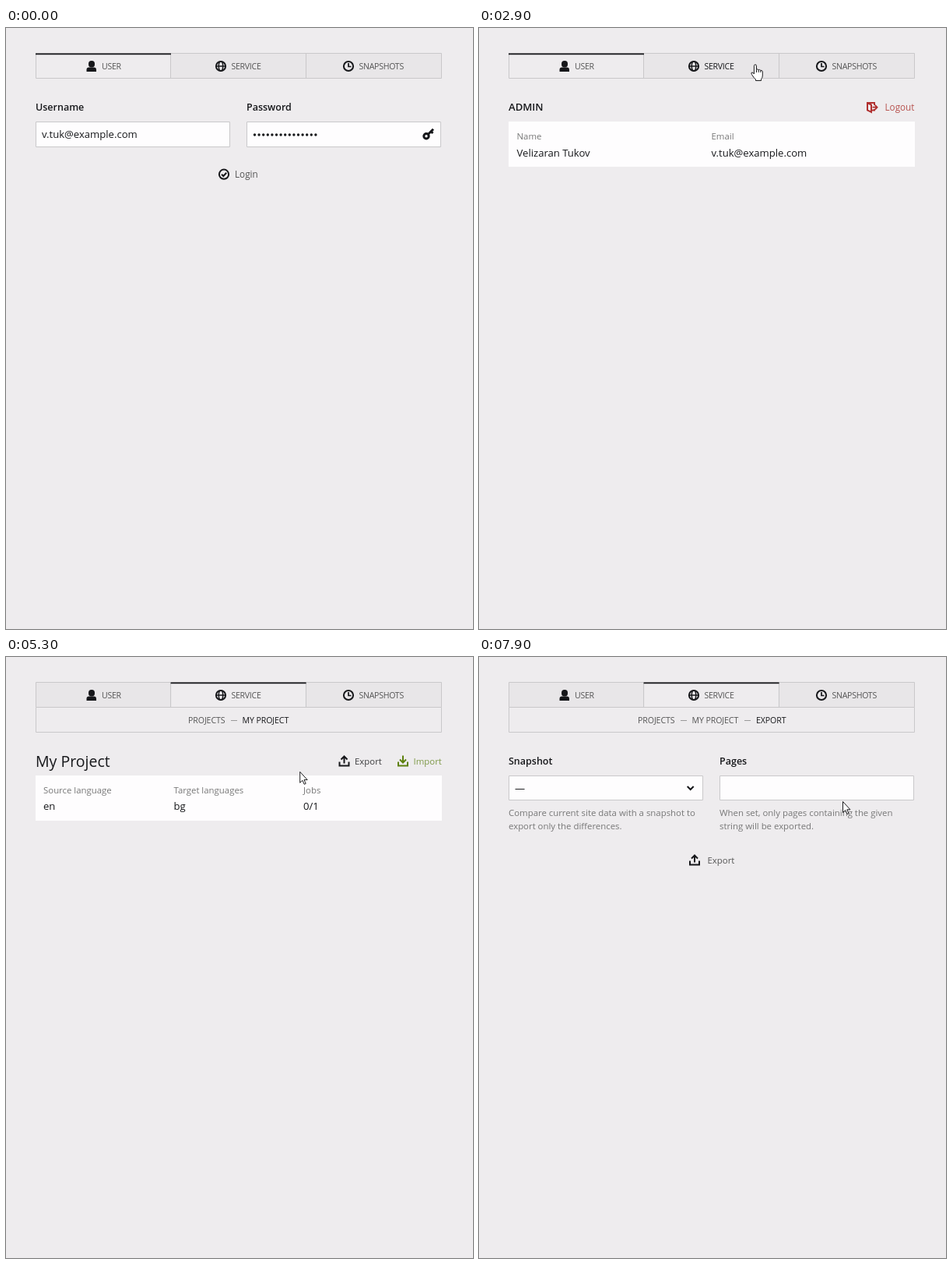
These frames come from a looping animation (600 px wide and 771 px high, 8000 ms). An HTML page:

```html
<!DOCTYPE html>
<html lang="en">
<head>
<meta charset="utf-8">
<title>Panel walkthrough</title>
<style>
  html, body { margin: 0; width: 100%; height: 100%; overflow: hidden; background: #eeecee; }
  svg { display: block; font: 11.4px "Open Sans", "Noto Sans", sans-serif; }
  text { fill: #17181b; white-space: pre; }
  .tab { font-size: 10.6px; letter-spacing: -.3px; fill: #555; }
  .crumb { font-size: 10.6px; letter-spacing: -.1px; }
  .label { font-size: 12.5px; font-weight: 600; }
  .value { font-size: 13.1px; }
  .button { font-size: 11.7px; }
  .small { font-size: 10.2px; letter-spacing: -.2px; }
  .title { font-size: 19.5px; }
  .muted { fill: #777; }
  .link { fill: #555; }
  .line { fill: none; stroke: #c9c8ca; }
  .dash { stroke: #999; }
  .field { fill: #fefdfe; stroke: #c9c8ca; }
  .card { fill: #fefdfe; }
  .icon { fill: none; stroke: #16171a; stroke-width: 2; }
  .solid { fill: #16171a; }
  .red { stroke: #b0302f; }
  .green { stroke: #5d800d; }
  .pointer { fill: #fff; stroke: #1c1c1e; stroke-linejoin: round; }
  .shadow { fill: #000; opacity: .05; }
</style>
</head>
<body>
<svg width="600" height="771" viewBox="0 0 600 771">
  <defs>
    <g id="tray"><path d="M-6 1V6H6V1"/></g>
    <g id="upload"><use href="#tray"/><path d="M0 3V-6M-4-2L0-6L4-2"/></g>
    <g id="download"><use href="#tray"/><path d="M0-7V2M-4-2L0 2L4-2"/></g>
  </defs>

  <g id="page">
    <path d="M38 32H560V65H38Z" fill="#e8e6e8"/>
    <path class="line" d="M38.5 32.5H559.5V64.5H38.5ZM211.5 33V64M385.5 33V64"/>
    <g id="active">
      <path d="M39 33H211V64H39Z" fill="#eeecee"/>
      <path class="solid" d="M38 32.4H212V34.2H38Z"/>
    </g>
    <g class="solid">
      <rect x="106" y="42" width="8" height="8.6" rx="3.8"/>
      <path d="M103.5 56V53.5Q103.5 50.5 106.5 50.5H113Q116 50.5 116 53.5V56Z"/>
    </g>
    <g class="icon">
      <circle cx="276" cy="49" r="6.1"/>
      <g stroke-width="1.5"><ellipse cx="276" cy="49" rx="2.7" ry="6"/><path d="M270 49H282"/></g>
      <circle cx="440" cy="49" r="6.1"/>
      <path d="M440 45V49.5H443.5" stroke-width="1.7"/>
    </g>
    <text class="tab" x="123" y="53">USER</text>
    <text class="tab" id="service" x="289.5" y="53">SERVICE</text>
    <text class="tab" x="453.5" y="53">SNAPSHOTS</text>
    <path class="line" id="crumbs" d="M38.5 65V96.5H559.5V65"/>

    <g id="login">
      <text class="label" x="38" y="106">Username</text>
      <text class="label" x="309" y="106">Password</text>
      <path class="field" d="M38.5 120.5H287.5V152.5H38.5ZM309.5 120.5H558.5V152.5H309.5Z"/>
      <text class="value" x="46" y="141.3">v.tuk@example.com</text>
      <path class="icon" d="M319.5 137H399" stroke-linecap="round" style="stroke-width:3.4;stroke-dasharray:0 5.6"/>
      <g class="icon" style="stroke-width:3">
        <circle cx="540" cy="138.7" r="3.2"/>
        <path d="M542.5 136.3L549 129.8M546 132.5L548.4 135"/>
      </g>
      <g class="icon"><circle cx="280" cy="187.7" r="6.1"/><path d="M277 187.8L279.3 190L283.2 185.8"/></g>
      <text class="button link" x="294" y="192">Login</text>
    </g>

    <g id="account">
      <text class="label" x="38" y="106.3" style="font-size:13.1px">ADMIN</text>
      <g class="icon red"><path d="M504 96H499V105.5L504 108V98.5L499 96M504 96H508V99M504 105.5H508V104"/><path d="M505.5 101.7H511.5M508.8 98.8L511.6 101.7L508.8 104.6" stroke-width="1.8"/></g>
      <text class="button" x="521.5" y="106.3" style="fill:#b85450">Logout</text>
      <path class="card" d="M38 120H560V178H38Z"/>
      <text class="muted" x="48.5" y="143.3">Name</text>
      <text class="muted" x="298.5" y="143.3">Email</text>
      <text class="value" x="48.5" y="164.5">Velizaran Tukov</text>
      <text class="value" x="298.5" y="164.5">v.tuk@example.com</text>
    </g>

    <g id="root"><text class="crumb" x="275" y="85">PROJECTS</text></g>

    <g id="list">
      <path class="shadow" d="M37 125H561V159H37Z"/>
      <path class="card" d="M38 124H560V157H38Z"/>
      <path class="solid" d="M38 124H71V157H38Z"/>
      <path class="icon" d="M49.5 134.5H60V146.5H49.5ZM52 137.5H55V140H52ZM56.5 137.5H58.5M56.5 140H58.5M52 142.5H58M52 144.3H58" style="stroke:#a5a5a7;stroke-width:1.2"/>
      <text class="button" x="81" y="145">My Project</text>
      <text class="small muted" x="421" y="144.8">9/24/2019, 2:19:35 PM</text>
      <text class="small muted" x="531" y="144.8" font-weight="600">#20</text>
    </g>

    <g id="trail">
      <text class="crumb link" x="234" y="85">PROJECTS</text>
      <path class="dash" d="M289 81.5H297"/>
      <text class="crumb" x="303.5" y="85">MY PROJECT</text>
    </g>

    <g id="project">
      <text class="title" x="38" y="141">My Project</text>
      <use class="icon" href="#upload" x="434.5" y="133.5"/>
      <text x="448" y="138.2" style="fill:#3c3c3e">Export</text>
      <use class="icon green" href="#download" x="510" y="133.5"/>
      <text x="523.5" y="138.2" style="fill:#7d9846">Import</text>
      <path class="card" d="M38 152H560V210H38Z"/>
      <text class="muted" x="48" y="175">Source language</text>
      <text class="muted" x="215.5" y="175">Target languages</text>
      <text class="muted" x="382" y="175">Jobs</text>
      <text class="value" x="48" y="196.3">en</text>
      <text class="value" x="215.5" y="196.3">bg</text>
      <text class="value" x="382" y="196.3">0/1</text>
    </g>

    <g id="export">
      <text class="crumb link" x="204" y="85">PROJECTS</text>
      <path class="dash" d="M259 81.5H267M341 81.5H349"/>
      <text class="crumb link" x="273.5" y="85">MY PROJECT</text>
      <text class="crumb" x="356" y="85">EXPORT</text>
      <text class="label" x="38" y="137.8">Snapshot</text>
      <text class="label" x="309" y="137.8">Pages</text>
      <path class="field" d="M38.5 152.5H287.5V183.5H38.5ZM309.5 152.5H558.5V183.5H309.5Z"/>
      <text class="value" x="46" y="172.5">—</text>
      <path class="icon" d="M267.7 166L271.7 170L275.7 166"/>
      <text class="muted" x="38" y="204">Compare current site data with a snapshot to</text>
      <text class="muted" x="38" y="221">export only the differences.</text>
      <text class="muted" x="309" y="204">When set, only pages containing the given</text>
      <text class="muted" x="309" y="221">string will be exported.</text>
      <use class="icon" href="#upload" x="277" y="260.5"/>
      <text class="link" x="293.5" y="265">Export</text>
    </g>
  </g>

  <path class="pointer" id="arrow" d="M.5.5V14.5L3.7 11.5L6 16.5L8 15.6L5.8 10.8H10Z"/>
  <path class="pointer" id="hand" d="M-1.6 12V1.4Q-1.5 0 0 0Q1.5 0 1.5 1.4V6.5Q2.8 5 4.2 6.8Q5.7 5.7 6.8 7.4Q8.8 6.8 9.3 9V14Q9.3 17 7.5 18.5V20.5H.5V19Q-2 17-4.6 12.5Q-5.6 10.8-4.5 10Q-3 9.5-1.6 12ZM1.5 6.5V10M4.2 6.8V10M6.8 7.4V10"/>
</svg>
<script>
const $ = id => document.getElementById(id);
const LOOP = 8000, STEP = 100;

// Visible time span of each part of the page
const spans = {
  login: [0, 2000], account: [2000, 3100],
  crumbs: [3100, LOOP], root: [3100, 5000], list: [3600, 5000],
  trail: [5000, 7100], project: [5300, 7100], export: [7100, LOOP],
  arrow: [100, LOOP]
};
const handSpans = [[900, 2000], [2700, 3200], [4200, 5000], [6500, 7100]];

// Pointer stops: time, x, y
const stops = [
  [100, 584, 273], [350, 330, 170], [550, 48, 101], [1000, 305, 207],
  [1200, 306, 212], [1500, 305, 207], [1900, 305, 207], [2000, 300, 192],
  [2200, 302, 180], [2900, 355, 47], [3700, 355, 47], [4500, 379, 145],
  [5500, 377, 147], [5900, 377, 147], [6300, 414, 148], [6700, 446, 139],
  [7200, 448, 139], [7900, 467, 185]
];
const opacityStops = [[0, 1], [1200, 1], [1500, .5], [1900, .5], [2000, .9], [2100, 1]];

const within = (t, [from, to]) => t >= from && t < to;

function sample(keys, t, column) {
  const next = keys.findIndex(k => k[0] > t);
  if (next < 0) return keys[keys.length - 1][column];
  if (next === 0) return keys[0][column];
  const a = keys[next - 1], b = keys[next];
  const p = (t - a[0]) / (b[0] - a[0]);
  return a[column] + (b[column] - a[column]) * p * p * (3 - 2 * p);
}

function draw(now) {
  const t = Math.floor(now % LOOP / STEP) * STEP;
  const show = (id, on) => $(id).style.display = on ? '' : 'none';
  for (const id in spans) show(id, within(t, spans[id]));

  const pointing = handSpans.some(span => within(t, span));
  show('hand', pointing);
  if (pointing) show('arrow', false);
  const place = `translate(${sample(stops, t, 1)} ${sample(stops, t, 2)})`;
  $('arrow').setAttribute('transform', place);
  $('hand').setAttribute('transform', place);

  $('active').setAttribute('transform', `translate(${t < 3100 ? 0 : 173.6})`);
  $('service').style.fill = within(t, [2800, 5000]) ? '#17181b' : '';
  $('page').style.opacity = sample(opacityStops, t, 1);
}

function loop(now) {
  draw(now);
  requestAnimationFrame(loop);
}
draw(0);
requestAnimationFrame(loop);
</script>
</body>
</html>
```
